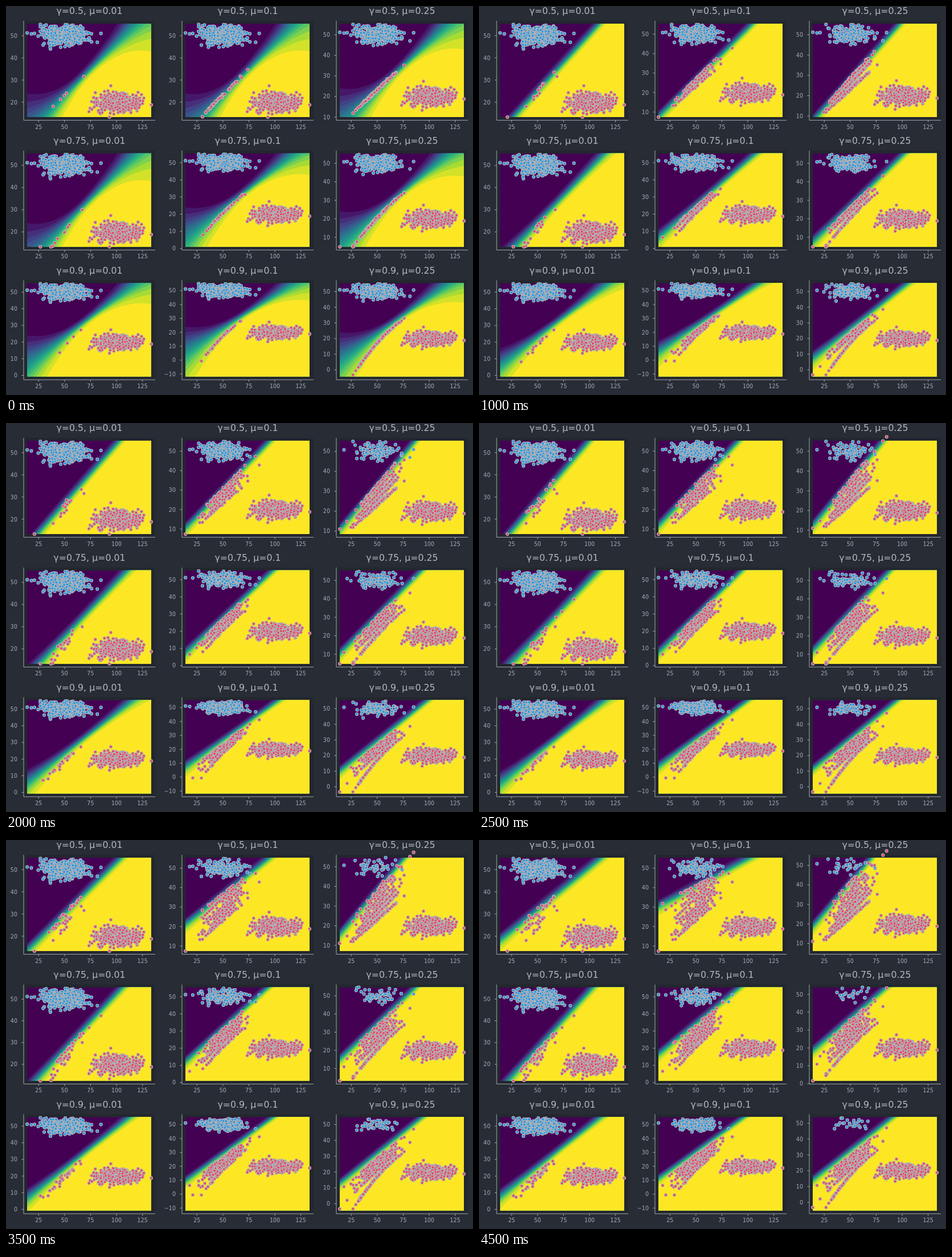
Animation of 820x683 px, one loop 5000 ms. Source, as an HTML page with a canvas:

```html
<!DOCTYPE html>
<html lang="en">
<head>
<meta charset="utf-8">
<title>Decision boundaries</title>
<style>
  html, body { margin: 0; width: 100%; height: 100%; overflow: hidden; background: #282c34; }
  canvas, svg { position: absolute; left: 0; top: 0; width: 820px; height: 683px; }
  text { font-family: "DejaVu Sans", sans-serif; font-size: 9.6px; fill: #a3abb8; }
  .title { font-size: 15.8px; fill: #b3b7be; text-anchor: middle; }
  .axis { stroke: #a3a9b3; stroke-width: 1; fill: none; }
</style>
</head>
<body>
<canvas id="plot"></canvas>
<svg id="axes" viewBox="0 0 820 683"></svg>
<script>
const W = 218, H = 164, PAD = 5.6, STEP = 500, STEPS = 10;
const X0 = 13.9, X1 = 133.4, UNIT = W / (X1 - X0);
const LEFT = [37, 315, 586], ROW = 227.8;
const GAMMA = [0.5, 0.75, 0.9], MU = [0.01, 0.1, 0.25];
const LEVELS = 16, BASE = 3.4;
const VIRIDIS = ['#440154', '#482878', '#3e4a89', '#31688e', '#26828e',
  '#1f9e89', '#35b779', '#6ece58', '#b5de2b', '#fde725'];
const BLUE = '#1c97ea', PINK = '#f03e60', RING = '#b0b2b6';

// low: bottom of the y range [before, after, first step, last step]
// mid, end: height of the boundary at x = 14 and x = 85, at steps 5 and 9
const SPECS = [
  { low: [13.3], mid: [9, 47.5], end: [18.5, 45.5] },
  { low: [13.3, 7.4, 0, 1], mid: [12, 52], end: [30.7, 50.7] },
  { low: [10, 6.1, 1, 9], mid: [12.5, 57.5], end: [19, 63] },
  { low: [13.3, 12.4, 5, 6], mid: [8.6, 43.9], end: [8.7, 46] },
  { low: [1], mid: [8, 50], end: [16.8, 52] },
  { low: [4.8, 1.6, 5, 9], mid: [12, 53.5], end: [18.8, 54.2] },
  { low: [-0.7], mid: [6, 41], end: [8, 43] },
  { low: [-11.8], mid: [8.2, 47.2], end: [11.5, 49.5] },
  { low: [-4.3, -5.2, 7, 8], mid: [11.8, 50], end: [14.5, 51] },
];

const lerp = (a, b, t) => a + (b - a) * t;
const ramp = (a, b, from, to, s) =>
  lerp(a, b, Math.min(1, Math.max(0, (s - from) / (to - from))));
const logit = p => Math.log(p / (1 - p));
const EDGE = logit(1 - 1 / LEVELS);
const xPos = v => (v - X0) * UNIT;

function randomizer(seed) {
  return () => {
    seed = (seed + 0x6D2B79F5) | 0;
    let t = Math.imul(seed ^ (seed >>> 15), 1 | seed);
    t = (t + Math.imul(t ^ (t >>> 7), 61 | t)) ^ t;
    return ((t ^ (t >>> 14)) >>> 0) / 4294967296;
  };
}
const normal = rnd => Math.sqrt(-2 * Math.log(1 - rnd())) * Math.cos(2 * Math.PI * rnd());

function cluster(rnd, n, cx, cy) {
  const pts = [];
  while (pts.length < n) {
    const dx = 10.2 * normal(rnd), dy = 2.1 * normal(rnd);
    if (Math.abs(dx) < 27 && Math.abs(dy) < 5.4) pts.push([cx + dx, cy + dy]);
  }
  return pts;
}

const rnd = randomizer(11);
const blue = [[14, 51.2], [18, 50.8], [21, 51], [36.4, 44], [81.5, 47], [85, 51]]
  .concat(cluster(rnd, 494, 50, 50));
const pink = [[93.2, 13.3], [133.4, 18.8], [94.5, 27.4]]
  .concat(cluster(rnd, 497, 100, 20));

function mix(t) {
  const f = t * (VIRIDIS.length - 1), i = Math.min(Math.floor(f), VIRIDIS.length - 2);
  const part = (c, k) => parseInt(c.slice(k, k + 2), 16);
  return 'rgb(' + [1, 3, 5].map(k =>
    Math.round(lerp(part(VIRIDIS[i], k), part(VIRIDIS[i + 1], k), f - i))) + ')';
}

// centre line and fan width of the class boundary after a number of steps
function boundary({ gamma, mu, mid, end }, s) {
  const first = [6, 39.8], next = [6.3, 41.5 + 14 * mu - 5 * (gamma - 0.5)];
  const [a, b, t] = s <= 1 ? [first, next, s]
    : s <= 5 ? [next, mid, (s - 1) / 4] : [mid, end, (s - 5) / 4];
  const left = lerp(a[0], b[0], t), slope = (lerp(a[1], b[1], t) - left) / 71;
  const extra = 60 * (gamma - 0.5) ** 2 * (1 - 2 * mu) * Math.exp(-(s - 1) * (0.18 + 3 * mu));
  return { left, slope, fan: s < 1 ? 20 : BASE + extra };
}

// one level line: two parabolas that meet at the pinch; level runs from -1 (blue) to 1 (pink)
function levelLine({ left, slope, fan }, level) {
  const px = 70 + 5 * level;
  const py = left + slope * (px - X0) - BASE * level;
  return {
    px, py,
    y0: left - fan * (1.2 * level + 0.3 * level * level),
    c0: py - slope * (px - X0) / 2,
    c1: py + slope * (X1 - px) / 2,
    y1: left + slope * (X1 - X0) - fan * level,
  };
}

function heightAt({ px, py, y0, c0, c1, y1 }, x) {
  const bezier = (a, c, b, t) => lerp(lerp(a, c, t), lerp(c, b, t), t);
  return x < px ? bezier(y0, c0, py, (x - X0) / (px - X0))
    : bezier(py, c1, y1, (x - px) / (X1 - px));
}

// every step a share mu of the blue points turns pink and drops onto the gamma level
const panels = SPECS.map((spec, i) => {
  const row = Math.floor(i / 3), col = i % 3, roll = randomizer(100 + i);
  const p = { ...spec, gamma: GAMMA[row], mu: MU[col], x: LEFT[col], y: 31 + row * ROW };
  p.points = blue.map(([x, y]) => {
    const turn = Math.floor(Math.log(1 - roll()) / Math.log(1 - p.mu));
    const line = levelLine(boundary(p, Math.min(turn, STEPS)), logit(p.gamma) / EDGE);
    return { x, y, turn, land: heightAt(line, x) + 0.3 * normal(roll) };
  });
  return p;
});

const canvas = document.getElementById('plot');
const ctx = canvas.getContext('2d');
const ratio = window.devicePixelRatio || 1;
canvas.width = 820 * ratio;
canvas.height = 683 * ratio;
ctx.scale(ratio, ratio);

const svg = document.getElementById('axes');
function add(parent, tag, attrs, text) {
  const el = document.createElementNS('http://www.w3.org/2000/svg', tag);
  for (const k in attrs) el.setAttribute(k, attrs[k]);
  if (text !== undefined) el.textContent = text;
  parent.appendChild(el);
  return el;
}

for (const p of panels) {
  const x = p.x - 6, y = p.y + H + PAD;
  add(svg, 'text', { class: 'title', x: p.x + W / 2 + 0.5, y: p.y - 16.8 },
    `γ=${p.gamma}, μ=${p.mu}`);
  add(svg, 'path', { class: 'axis', d: `M${x} ${p.y - 5}V${y}H${p.x + W + 7}` });
  for (let v = 25; v <= 125; v += 25) {
    const tx = p.x + xPos(v);
    add(svg, 'path', { class: 'axis', d: `M${tx} ${y}v3.5` });
    add(svg, 'text', { x: tx, y: y + 15, 'text-anchor': 'middle' }, v);
  }
  p.ticks = add(svg, 'g', {});
}

function drawTicks(p, yPos) {
  p.ticks.replaceChildren();
  const x = p.x - 6;
  for (let v = -10; v <= 50; v += 10) {
    const y = yPos(v);
    if (y > H + PAD) continue;
    add(p.ticks, 'path', { class: 'axis', d: `M${x} ${p.y + y}h-3.5` });
    add(p.ticks, 'text', { x: x - 11, y: p.y + y + 3.6, 'text-anchor': 'end' },
      String(v).replace('-', '−'));
  }
}

function drawField(state, yPos) {
  ctx.save();
  ctx.beginPath();
  ctx.rect(0, 0, W, H);
  ctx.clip();
  ctx.fillStyle = VIRIDIS[0];
  ctx.fillRect(0, 0, W, H);
  for (let k = 1; k < LEVELS; k++) {
    const { px, py, y0, c0, c1, y1 } = levelLine(state, logit(k / LEVELS) / EDGE);
    const mid = xPos(px);
    ctx.beginPath();
    ctx.moveTo(0, yPos(y0));
    ctx.quadraticCurveTo(mid / 2, yPos(c0), mid, yPos(py));
    ctx.quadraticCurveTo((mid + W) / 2, yPos(c1), W, yPos(y1));
    ctx.lineTo(W, 2 * H);
    ctx.lineTo(0, 2 * H);
    ctx.fillStyle = mix(k / (LEVELS - 1));
    ctx.fill();
  }
  ctx.restore();
}

function dot(x, y, color) {
  ctx.beginPath();
  ctx.arc(x, y, 2.5, 0, 2 * Math.PI);
  ctx.fillStyle = color;
  ctx.fill();
  ctx.stroke();
}

function drawPanel(p, step) {
  const [before, after = before, from = 0, to = 1] = p.low;
  const lo = ramp(before, after, from, to, step);
  const hi = p.mu > 0.2 ? ramp(55.4, 53.9, 5, 9, step) : 55.4;
  const yPos = v => H * (hi - v) / (hi - lo);
  ctx.save();
  ctx.translate(p.x, p.y);
  ctx.fillStyle = '#23272e';
  ctx.fillRect(-PAD, -5, W + PAD + 7, H + PAD + 5);
  drawField(boundary(p, step), yPos);
  ctx.lineWidth = 1.25;
  ctx.strokeStyle = RING;
  for (const q of p.points)
    if (q.turn > step && q.y <= hi + 0.2) dot(xPos(q.x), yPos(q.y), BLUE);
  for (const [x, y] of pink) dot(xPos(x), yPos(y), PINK);
  for (const q of p.points)
    if (q.turn <= step) dot(xPos(q.x), yPos(Math.max(lo, q.land)), PINK);
  ctx.restore();
  drawTicks(p, yPos);
}

let shown = -1;
function render(time) {
  const step = Math.floor(time / STEP) % STEPS;
  if (step === shown) return;
  shown = step;
  ctx.clearRect(0, 0, 820, 683);
  for (const p of panels) drawPanel(p, step);
}

const begin = performance.now();
function tick() {
  render(performance.now() - begin);
  requestAnimationFrame(tick);
}
tick();
</script>
</body>
</html>
```
